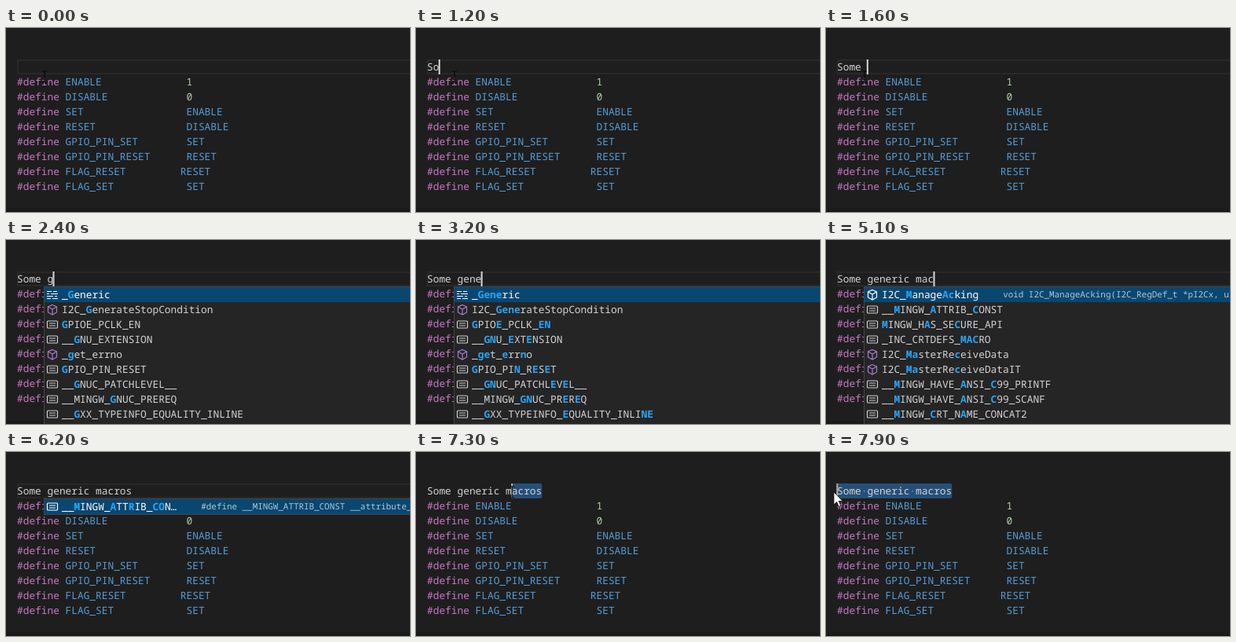
Recreate the animation shown at these times as an HTML page. Size 514x234 px, loop 8000 ms.

```html
<!DOCTYPE html>
<html lang="en">
<head>
<meta charset="utf-8">
<title>Code editor typing</title>
<style>
html, body { margin: 0; width: 100%; height: 100%; overflow: hidden; background: #1e1e1e; }
svg { display: block; width: 514px; height: 234px; }
text {
  font: 12.833px "Noto Sans Mono", "DejaVu Sans Mono", monospace;
  white-space: pre;
  text-rendering: geometricPrecision;
  fill: #d4d4d4;
}
.key { fill: #c977c6; }
.name { fill: #569cd6; }
.num { fill: #b5cea8; }
.hit { fill: #2aa5f5; font-weight: 700; }
.on { fill: #fff; font-weight: 500; }
.info { font-size: 10.908px; fill: #b3c6d4; }
.dot { fill: #7d95ad; }
.icon { fill: none; stroke: #d0d0d0; stroke-width: 1.2; }
.cube { stroke: #a57cc9; }
.picked { stroke: #fff; }
</style>
</head>
<body>
<svg id="stage" viewBox="0 0 514 234"></svg>
<script>
const LOOP = 8000, LEFT = 14, CH = 7.7, ROW = 19, TOP = 40;
const stage = document.getElementById('stage');
const LINE = 'Some generic macros';

const defines = [
  ['ENABLE', '1'], ['DISABLE', '0'], ['SET', 'ENABLE'], ['RESET', 'DISABLE'],
  ['GPIO_PIN_SET', 'SET'], ['GPIO_PIN_RESET', 'RESET'],
  ['FLAG_RESET', 'RESET', 19], ['FLAG_SET', 'SET']
];

// Icon letter, then the label with matched letters in brackets.
const gene = [
  'k _[Gene]ric', 'm I2C_[Gene]rateStopCondition', 'c [G]PIO[E]_PCLK_[EN]',
  'c __[GN]U_[E]XT[E]NSION', 'm _[ge]t_[e]rr[n]o', 'c [G]PIO_PI[N]_R[E]S[E]T',
  'c __[GN]UC_PATCHL[E]V[E]L__', 'c __MINGW_[GN]UC_PR[E]R[E]Q',
  'c __[G]XX_TYPEINFO_[E]QUALITY_INLI[NE]'
];
const mac = [
  'm I2C_[M]anage[Ac]king', 'c __[M]INGW_[A]TTRIB_[C]ONST', 'c [M]INGW_H[A]S_SE[C]URE_API',
  'c _INC_CRTDEFS_[MAC]RO', 'm I2C_[Ma]sterRe[c]eiveData', 'm I2C_[Ma]sterRe[c]eiveDataIT',
  'c __[M]INGW_HAVE_[A]NSI_[C]99_PRINTF', 'c __[M]INGW_HAVE_[A]NSI_[C]99_SCANF',
  'c __[M]INGW_[C]RT_N[A]ME_CONCAT2'
];
const gener = ['k _[Generic]', 'm I2C_[Gener]ateStopCond[i]tion'];
const macro = ['c _INC_CRTDEFS_[MACRO]', 'c __[M]INGW_[A]TT[R]IB_[CO]NST'];
const macros = ['c __[M]INGW_[A]TT[R]IB_[CO]N…'];
const acking = 'void I2C_ManageAcking(I2C_RegDef_t *pI2Cx, uint8_t';
const attrib = '#define __MINGW_ATTRIB_CONST __attribute__';

// Time, typed letters, suggestion list, matched letters, detail text.
const keys = [
  [-500, 0], [1100, 1], [1200, 2], [1400, 3], [1500, 4], [1600, 5],
  [2200, 6, gene, 1], [2700, 7, gene, 2], [3000, 8, gene, 3], [3200, 9, gene, 4],
  [3300, 10, gener, 5], [3500, 11, gener, 6], [3700, 12, gener, 7], [3900, 13],
  [4900, 14], [5000, 15, mac, 2, acking], [5100, 16, mac, 3, acking],
  [5300, 17, macro, 4], [5500, 18, macro, 5], [5700, 19, macros, 6]
];

const text = (x, y, body, cls = '') => `<text x="${x}" y="${y}" class="${cls}">${body}</text>`;
const span = (cls, s) => `<tspan class="${cls}">${s}</tspan>`;
const rect = (x, y, w, h, fill, more = '') =>
  `<rect x="${x}" y="${y}" width="${w}" height="${h}" fill="${fill}" ${more}/>`;
const ease = (t, a, b) => {
  const u = Math.min(1, Math.max(0, (t - a) / (b - a)));
  return u * u * (3 - 2 * u);
};

const code = defines.map(([name, value, pad = 20], i) =>
  text(LEFT, 73 + i * ROW, span('key', '#define ') + span('name', name.padEnd(pad)) +
    span(/\d/.test(value) ? 'num' : 'name', value))).join('');

const shapes = {
  m: 'M59 63.500l5.500 2.500v7l-5.500 3-5.500-3v-7zM53.500 66l5.500 3 5.500-3M59 69v7',
  c: 'M53.500 65h11q1 0 1 1v7q0 1-1 1h-11q-1 0-1-1v-7q0-1 1-1zM55 68h8M55 71h8',
  k: 'M52 65.500h6M60 65.500h5M52 68.500h3M57 68.500h9M52 71.500h8M62 71.500h3M52 74.500h5M59 74.500h7'
};

function label(marked, hits) {
  return marked.split(/[\[\]]/).map((part, i) => {
    if (i % 2 === 0) return part;
    const n = Math.min(hits, part.length);
    hits -= n;
    return span('hit', part.slice(0, n)) + part.slice(n);
  }).join('');
}

function popup(list, hits, info) {
  const h = list.length > 8 ? 190 : list.length * ROW + 1;
  let out = rect(48.5, 59.5, 480, h, '#252526', 'stroke="#454545"') +
    rect(49, 60, 470, ROW, '#094771');
  list.forEach((item, i) => {
    const kind = item[0], y = i * ROW;
    const cls = i === 0 ? 'picked' : kind === 'm' ? 'cube' : '';
    out += `<path class="icon ${cls}" transform="translate(0 ${y})" d="${shapes[kind]}"/>` +
      text(71, 74 + y, label(item.slice(2), hits), i ? '' : 'on');
  });
  if (info) {
    const size = list[0].slice(2).replace(/[\[\]]/g, '').length;
    out += text(71 + size * CH + 31, 73, info, 'info');
  }
  return out;
}

function pointer(x, y) {
  if (x < LEFT) {
    return `<path transform="translate(${x} ${y})" d="M0 0v16l3.700-3.500 2.500 5.800 2.500-1-2.500-5.800h5z" fill="#fff" stroke="#111" stroke-width=".8"/>`;
  }
  return `<path transform="translate(${x} ${y})" d="M-3-7h2.500l.5.700.500-.7h2.500M0-6.500v13M-3 7h2.500l.500-.7.500.700h2.500" fill="none" stroke="#080808" stroke-width="1.200"/>`;
}

function scene(t) {
  const [at, typed, list, hits, info] = keys.filter(k => k[0] <= t).pop();
  const open = list && t < 6900;
  const toEnd = ease(t, 6700, 7050), back = ease(t, 7100, 7700);
  const mx = 49 + 113 * toEnd - 152 * back, my = 62 - 11 * toEnd;

  const col = t < 7100 ? typed : Math.max(0, Math.min(19, Math.round((mx - LEFT) / CH)));
  const selected = col < typed;
  const caretX = LEFT + col * CH;
  const caretOn = selected || (t - at) % 1000 < 500;

  let out = rect(0, 0, 514, 234, '#1e1e1e') + rect(0, 230, 514, 4, '#1a1a1a');
  if (selected) {
    out += rect(caretX, TOP, (typed - col) * CH, ROW, '#264f78', 'rx="2"');
    const dots = [...LINE].map((c, i) => c === ' ' && i >= col ? '·' : ' ').join('');
    out += text(LEFT, 54, dots, 'dot');
  } else {
    out += rect(15, 41, 520, 17, 'none', 'stroke="#282828" stroke-width="2"');
  }
  out += text(LEFT, 54, LINE.slice(0, typed)) + code;
  if (caretOn) out += rect(caretX - 0.7, TOP, 2, ROW, selected ? '#aeafad' : '#d8d8d8');
  if (open) out += popup(list, hits, list === macros && t < 5900 ? '' : info || (list === macros ? attrib : ''));
  if (!open || t > 6700) out += pointer(mx, my);
  return out;
}

let last = '';
function frame(now) {
  const next = scene(now % LOOP);
  if (next !== last) stage.innerHTML = last = next;
  requestAnimationFrame(frame);
}
stage.innerHTML = last = scene(0);
requestAnimationFrame(frame);
</script>
</body>
</html>
```
